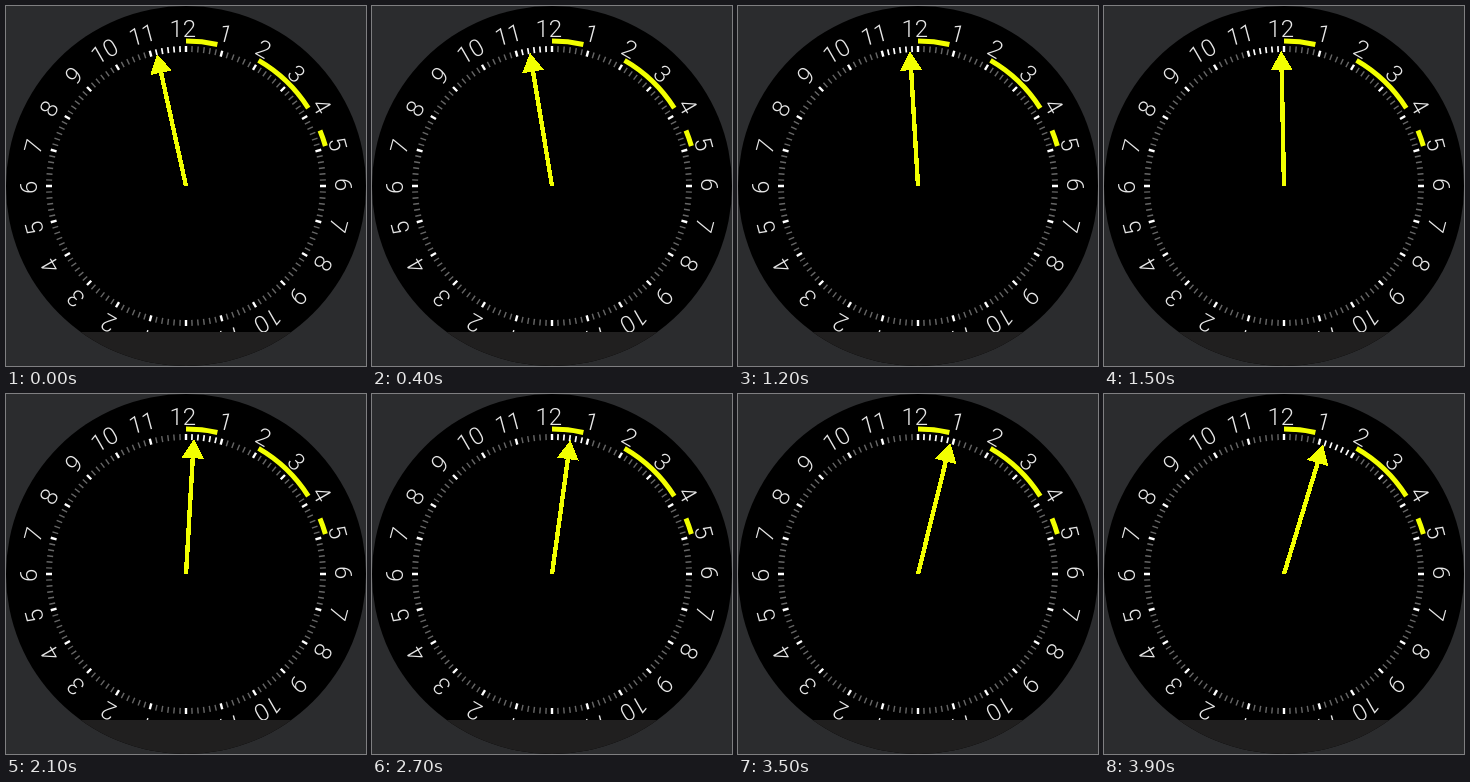
An HTML page for the animation above (4000 ms loop, 360 by 360 pixels).

```html
<!DOCTYPE html>
<html lang="en">
<head>
<meta charset="utf-8">
<title>24-hour dial</title>
<style>
  html, body { margin: 0; width: 100%; height: 100%; overflow: hidden; background: #2b2c2e; }
  svg { display: block; width: 360px; height: 360px; }
  text { font: 300 24px Roboto, sans-serif; fill: #e6e6e6; text-anchor: middle; }
  .minor { stroke: #666; stroke-width: 1.4; }
  .minor.on { stroke: #fff; stroke-width: 1.7; }
  .major { stroke: #fff; stroke-width: 2.4; }
  .arc { fill: none; stroke: #f2ff00; stroke-width: 5; }
  #hand { shape-rendering: crispEdges; }
</style>
</head>
<body>
<svg viewBox="0 0 360 360">
  <defs><clipPath id="face"><circle cx="180" cy="180" r="180"/></clipPath></defs>
  <g clip-path="url(#face)">
    <rect width="360" height="360"/>
    <g id="dial" transform="translate(180 180)"></g>
    <g id="hand">
      <path d="M180 180V62" stroke="#f2ff00" stroke-width="4.4"/>
      <path d="M180 45L191 64H169Z" fill="#f2ff00"/>
    </g>
    <rect y="326" width="360" height="34" fill="#201f1f"/>
  </g>
</svg>
<script>
  const LOOP = 4000, STEP = 100;
  const START = -12.4, SPEED = 7.5 / 1000; // degrees, degrees per ms
  const HOUR = 15, TICKS = 6; // degrees per hour, ten-minute ticks per hour
  const ARCS = [[0, 12.5], [30, 57.5], [67.5, 74]];

  const dial = document.getElementById('dial');
  const hand = document.getElementById('hand');

  function add(tag, attrs, label = '') {
    const el = document.createElementNS('http://www.w3.org/2000/svg', tag);
    for (const key in attrs) el.setAttribute(key, attrs[key]);
    el.textContent = label;
    return dial.appendChild(el);
  }

  function point(deg, r) {
    const a = deg * Math.PI / 180;
    return `${r * Math.sin(a)} ${-r * Math.cos(a)}`;
  }

  const minors = [];
  for (let i = 0; i < 24 * TICKS; i++) {
    const deg = i * HOUR / TICKS;
    const major = i % TICKS === 0;
    const el = add('path', {
      class: major ? 'major' : 'minor',
      d: `M${point(deg, 134)}L${point(deg, 140)}`
    });
    if (!major) minors.push({ el, hour: Math.floor(i / TICKS) });
  }

  for (let h = 0; h < 24; h++) {
    const label = String(h % 12 || 12);
    add('text', {
      x: label.length > 1 ? -3.3 : -1.3,
      y: -149,
      transform: `rotate(${h * HOUR})`
    }, label);
  }

  for (const [from, to] of ARCS) {
    add('path', { class: 'arc', d: `M${point(from, 145)}A145 145 0 0 1 ${point(to, 145)}` });
  }

  let litHour = -1;
  function draw(time) {
    const t = Math.floor(time % LOOP / STEP) * STEP;
    const angle = START + t * SPEED;
    hand.setAttribute('transform', `rotate(${angle} 180 180)`);

    const hour = (Math.floor(angle / HOUR) + 24) % 24;
    if (hour !== litHour) {
      litHour = hour;
      for (const m of minors) m.el.classList.toggle('on', m.hour === hour);
    }
  }

  const begin = performance.now();
  function frame() {
    draw(performance.now() - begin);
    requestAnimationFrame(frame);
  }
  frame();
</script>
</body>
</html>
```
